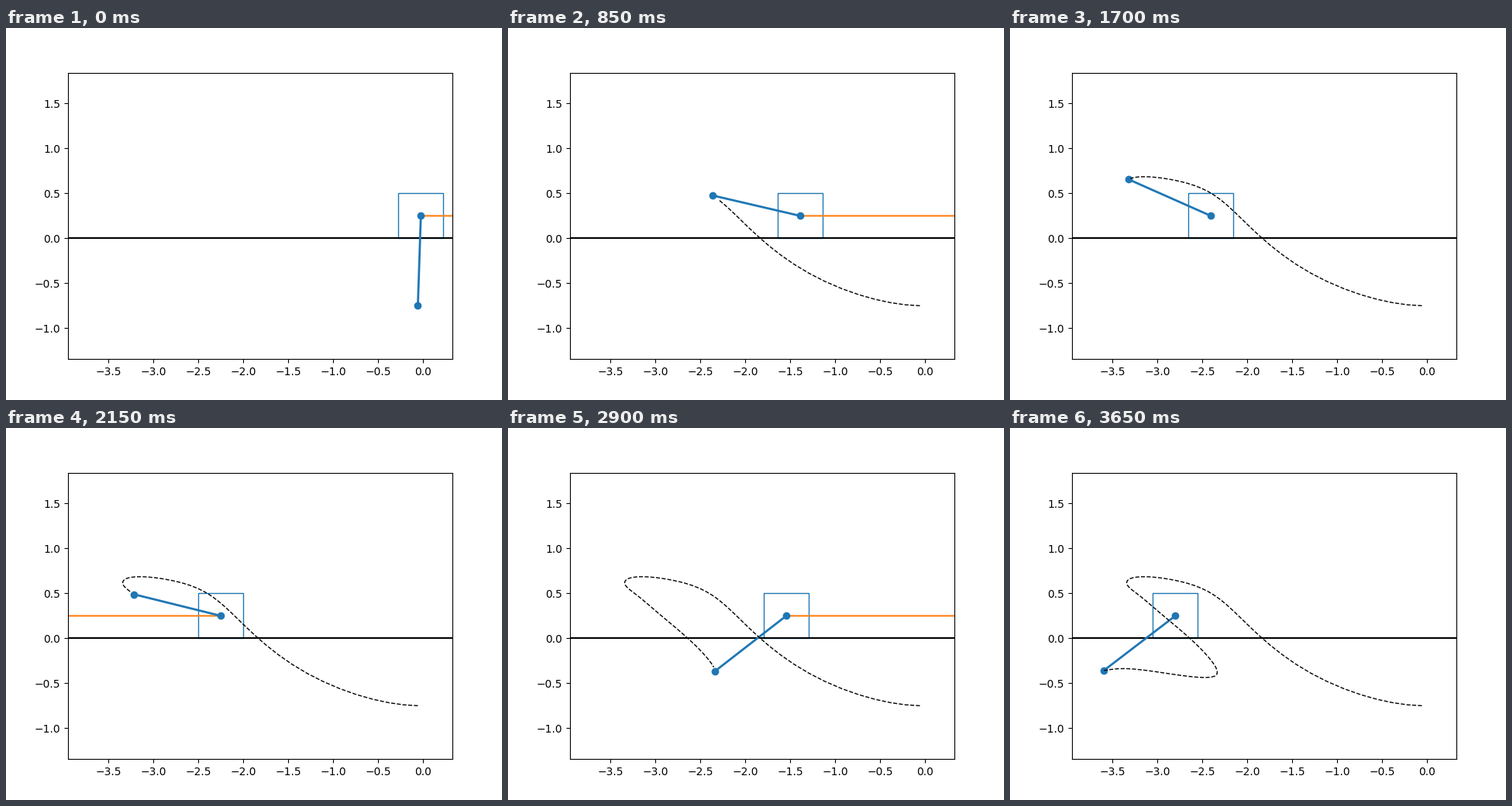
These frames come from a looping animation (640x480 px, 4.9 s). A matplotlib script:

```python
import numpy as np
import matplotlib.pyplot as plt
from matplotlib.animation import FuncAnimation
from matplotlib.patches import Rectangle

INTERVAL = 50
FRAMES = 98
LAST = 73           # the pose reached here is held to the end of the loop
SIDE = 0.5
PIVOT = SIDE / 2

# key poses: step, cart position, pole angle (degrees left of hanging down)
KEYS = np.array([
    (0, -0.026, 1.9), (3, -0.184, 21.7), (7, -0.524, 50.4),
    (11, -0.888, 77.0), (17, -1.390, 103.1), (23, -1.888, 113.3),
    (34, -2.406, 113.9), (39, -2.380, 109.1), (44, -2.203, 102.1),
    (48, -1.960, 91.3), (52, -1.664, 75.0), (56, -1.530, 58.6),
    (60, -1.617, 48.0), (64, -1.914, 47.7), (70, -2.543, 54.1),
    (LAST, -2.802, 52.6),
])

SWITCHES = (13, 16, 19, 22, 24, 49, 67)   # the thrust reverses at these steps
COASTS = (34, LAST)                       # no thrust


def spline(t, knots, values):
    """Natural cubic spline, built from |t - knot|^3 plus a straight line."""
    def basis(s):
        cubes = np.abs(s[:, None] - knots) ** 3
        return np.column_stack([cubes, np.ones_like(s), s])

    line = np.column_stack([np.ones_like(knots), knots])
    balance = np.hstack([line.T, np.zeros((2, 2))])
    weights = np.linalg.solve(np.vstack([basis(knots), balance]),
                              np.vstack([values, np.zeros((2, 2))]))
    return basis(t) @ weights


poses = spline(np.linspace(0, 1, LAST + 1), KEYS[:, 0] / LAST, KEYS[:, 1:])
cart_x = poses[:, 0]
angle = np.radians(poses[:, 1])
tip_x = cart_x - np.sin(angle)
tip_y = PIVOT - np.cos(angle)


def thrust_direction(step):
    if step in COASTS:
        return 0
    return (-1) ** int(np.searchsorted(SWITCHES, step, side="right"))


fig, ax = plt.subplots(figsize=(6.4, 4.8), dpi=100)
ax.set_xlim(-3.951, 0.325)
ax.set_ylim(PIVOT - 1.593, PIVOT + 1.593)

ax.axhline(0, color="black")
cart = ax.add_patch(Rectangle((0, 0), SIDE, SIDE, fill=False, ec="C0", lw=1))
thrust, = ax.plot([], [], color="C1", snap=False)
pole, = ax.plot([], [], "o-", color="C0", lw=2)
trail, = ax.plot([], [], "k--", lw=1)


def update(frame):
    i = min(frame, LAST)
    x = cart_x[i]
    cart.set_x(x - SIDE / 2)
    pole.set_data([x, tip_x[i]], [PIVOT, tip_y[i]])
    thrust.set_data([x, x + 10 * thrust_direction(i)], [PIVOT, PIVOT])
    # the trail lags one step behind until the motion ends
    end = i if i < LAST else LAST + 1
    trail.set_data(tip_x[:end], tip_y[:end])
    return cart, thrust, pole, trail


anim = FuncAnimation(fig, update, frames=FRAMES, interval=INTERVAL,
                     repeat=True, repeat_delay=0)
plt.show()
```
